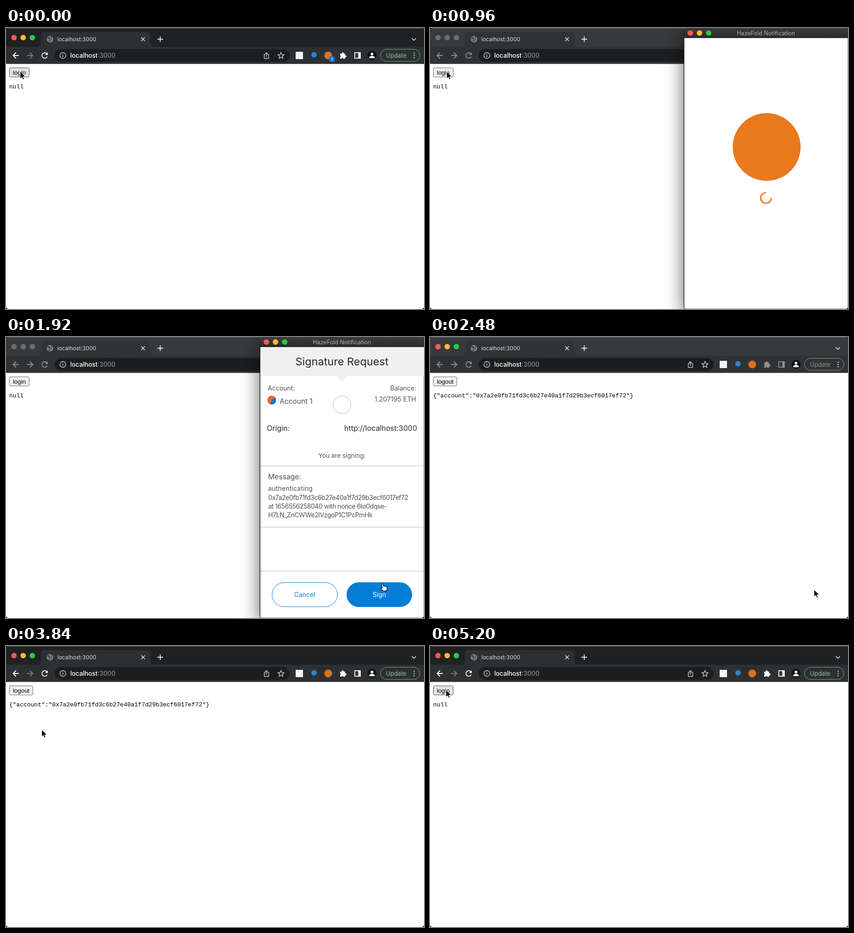
These frames come from a looping animation (912x614 px, 5360 ms). An HTML page:

```html
<!DOCTYPE html>
<html lang="en">
<head>
<meta charset="utf-8">
<title>Login flow</title>
<style>
html, body { margin: 0; width: 100%; height: 100%; overflow: hidden; background: #000; }
svg { display: block; width: 912px; height: 614px; font-family: Inter, "Open Sans", sans-serif; }
#stage { --frame: #1f2122; --bar: #2d3032; --icon: #fff; --fwd: #7b7e81; --update: #81c995; }
#stage.idle { --frame: #37393b; --bar: #303335; --icon: #8f9294; --fwd: #8f9294; --update: #8b9690; }
.frame { fill: var(--frame); }
.bar { fill: var(--bar); }
.line { fill: none; stroke: var(--icon); stroke-width: 1.8; }
.soft { fill: none; stroke: #c8cbce; stroke-width: 1.4; }
.solid { fill: var(--icon); }
.mono { font: 13px "Liberation Mono", monospace; }
.btn { font: 13.33px "Liberation Sans", Arial, sans-serif; }
.body { font-size: 14px; fill: #4d5156; }
.tight { letter-spacing: -.43px; }
.rule { stroke: #b9bbbd; }
.end { text-anchor: end; }
.mid { text-anchor: middle; }
</style>
</head>
<body>
<svg id="stage" viewBox="0 0 912 614">
  <defs>
    <clipPath id="corners"><rect width="912" height="614" rx="5"/></clipPath>
    <filter id="shadow" x="-30%" y="-20%" width="160%" height="145%">
      <feDropShadow dx="0" dy="14" stdDeviation="20" flood-color="#000" flood-opacity=".6"/>
    </filter>
    <linearGradient id="titlebar" x2="0" y2="1">
      <stop stop-color="#3c3d3f"/><stop offset="1" stop-color="#292a2b"/>
    </linearGradient>
  </defs>

  <g clip-path="url(#corners)">
    <rect width="912" height="614" fill="#fff"/>
    <rect class="frame" width="912" height="42"/>
    <path d="M0 .5H912" stroke="#66686a"/>
    <rect class="bar" y="41" width="912" height="37.5"/>
    <path class="bar" d="M68 41q8 0 8-8V17q0-8 8-8H307q8 0 8 8V33q0 8 8 8Z"/>
    <g id="lights"></g>

    <circle cx="96" cy="24.5" r="7" fill="#8d9093"/>
    <path d="M91 21q4-1 4 1t3 2-1 4-3-2-4-2M98 18q0 3 4 4" fill="none" stroke="#3b3e40" stroke-width="1.7"/>
    <text x="112" y="29" font-size="12" fill="#dcdee0">localhost:3000</text>
    <path d="M295 20.5l8 8m0-8l-8 8" stroke="#e2e4e6" stroke-width="1.6"/>
    <path d="M330.500 24.500h12m-6-6v12" stroke="#eee" stroke-width="1.8"/>
    <path d="M885.500 22.500l4.500 4.500 4.500-4.500" fill="none" stroke="#e2e4e6" stroke-width="1.7"/>

    <path class="line" d="M28 60H15.500m6.500-6.500L15.500 60l6.500 6.500"/>
    <path class="line" style="stroke:var(--fwd)" d="M46 60h12.500m-6.500-6.500l6.500 6.500-6.500 6.500"/>
    <path class="line" d="M90 62.500a6 6 0 1 1-1.500-7"/>
    <path class="solid" d="M91 53v6h-6z"/>

    <rect x="106" y="46" width="513" height="28" rx="14" fill="#1b1d1e"/>
    <circle class="soft" cx="124" cy="60" r="6.500"/>
    <path d="M124 59v4.500m0-7.500v1.500" stroke="#c8cbce" stroke-width="1.500"/>
    <text x="140" y="65" font-size="13.800" fill="#9aa0a6"><tspan fill="#fff" font-weight="500">localhost</tspan>:3000</text>
    <path class="soft" d="M566 58h-2.500v8.500h9.500V58H570.500M568.200 63v-9m-3 2.800l3-3 3 3"/>
    <path class="soft" d="M600 53.500l1.900 4.500 4.800.4-3.700 3.200 1.100 4.700-4.100-2.500-4.100 2.500 1.100-4.700-3.700-3.200 4.800-.4z"/>

    <rect x="632" y="52" width="16" height="16" fill="#f4f4f4"/>
    <circle cx="672" cy="58.500" r="6" fill="#2f83cf"/>
    <circle cx="703" cy="60" r="8.500" fill="#d9721f"/>
    <g id="badge">
      <rect x="705" y="62" width="12" height="12" rx="2" fill="#1273de"/>
      <text class="mid" x="711" y="71.500" font-size="9" fill="#fff">1</text>
    </g>
    <path class="solid" d="M729 56h3.500a2.200 2.200 0 1 1 4.200 0H740v4a2.200 2.200 0 1 1 0 4.200V67h-4a2.200 2.200 0 0 0-4 0h-3v-3.500a2.200 2.200 0 0 0 0-4z"/>
    <rect class="line" x="761" y="54" width="12" height="12"/>
    <path class="solid" d="M768.500 53h5.500v14h-5.500z"/>
    <circle cx="798.500" cy="60" r="10" fill="#111213"/>
    <circle cx="798.500" cy="57" r="3" fill="#fff"/>
    <path d="M792.500 66v-1.500q0-3.500 6-3.500t6 3.500V66z" fill="#fff"/>
    <rect x="817" y="46.500" width="86" height="26.500" rx="13.200" fill="none" stroke="#6fb184"/>
    <text x="829" y="64.500" font-size="13" style="fill:var(--update)">Update</text>
    <path d="M890.500 55v.01m0 4.990v.01m0 4.990v.01" stroke="#9fc9ac" stroke-width="2.800" stroke-linecap="round"/>

    <rect id="button" x="7.500" y="87" height="20" rx="2.500"/>
    <text id="label" class="btn" x="15" y="101.500"></text>
    <text id="output" class="mono" x="7" y="132"></text>

    <g id="popup">
      <rect x="554" y="1" width="358" height="613" rx="5" fill="#fff" stroke="#222" filter="url(#shadow)"/>
      <path d="M554.500 22V5q0-5 5-5H907q5 0 5 5V22z" fill="url(#titlebar)"/>
      <path d="M554.500 5V610" stroke="#222"/>
      <g id="popupLights"></g>
      <text id="popupTitle" class="mid" x="733" y="16" font-size="12.500" fill="#b2b3b4">HazeFold Notification</text>

      <g id="loading">
        <circle cx="734.500" cy="260" r="74" fill="#e8791f"/>
        <path id="spinner" d="M744.500 371.500a11.500 11.500 0 1 1-11.500-11.500" fill="none" stroke="#e8842f" stroke-width="3.200"/>
      </g>

      <g id="request">
        <path d="M555 22H912V85H747L733 98 719 85H555z" fill="#f0f0f1"/>
        <text class="mid" x="733" y="62" font-size="23.500" fill="#24272a">Signature Request</text>
        <g class="body">
          <text x="571" y="117">Account:</text>
          <text class="end" x="895" y="117">Balance:</text>
          <text x="597" y="146" font-size="15.500">Account 1</text>
          <text class="end" x="895" y="141" font-size="14.300">1.207195 ETH</text>
          <text class="mid" x="733" y="264" font-size="13.600">You are signing:</text>
          <text x="572" y="311" font-size="15.600">Message:</text>
          <text x="572" y="336" letter-spacing=".2">authenticating</text>
          <text id="hash" class="tight" x="572" y="355.500"></text>
          <text class="tight" x="572" y="375">at 1656556258040 with nonce 6Io0dqse-</text>
          <text class="tight" x="572" y="394">H7LN_ZnCWWe2IVzgoP1C1PcPmHk</text>
        </g>
        <circle cx="580" cy="138" r="9.500" fill="#1f74c4"/>
        <path d="M587 131.500A9.500 9.500 0 1 0 576 146.600L580 138z" fill="#f2602c"/>
        <circle cx="733" cy="148" r="19.500" fill="#fff" stroke="#b4b6b8"/>
        <g font-size="16" fill="#24272a">
          <text x="569" y="205">Origin:</text>
          <text class="end" x="897" y="205">http://localhost:3000</text>
        </g>
        <path class="rule" d="M555 281.500H912M555 415.500H912M555 511.500H912"/>
        <g class="mid" font-size="14">
          <rect x="580.500" y="536.500" width="142.500" height="53" rx="26.500" fill="#fff" stroke="#037dd6"/>
          <text x="651.500" y="568" fill="#037dd6">Cancel</text>
          <rect x="743" y="536" width="143" height="54" rx="27" fill="#037dd6"/>
          <text x="814.500" y="568" fill="#fff">Sign</text>
        </g>
      </g>
    </g>

    <g id="cursor">
      <path id="arrow" d="M0 0V15.500L3.600 12.200 6 17.600 8.600 16.400 6.200 11.200H11z" fill="#000" stroke="#fff"/>
      <path id="hand" d="M-1.500 1q1.500-1.800 2.800.2L3 5.500q1.500-1 2.500.3 1.500-.8 2.500.5 1.800-.3 2.200 1.500l.3 4-1.800 4H2L-2.800 10.500q-1.200-2 .8-2.200L.300 9.500z" fill="#fff" stroke="#000" stroke-width="1.200"/>
    </g>
  </g>
</svg>
<script>
const LOOP = 5360, STEP = 80;
const ACCOUNT = "0x7a2e0fb71fd3c6b27e40a1f7d29b3ecf6017ef72";
const LIGHTS = ["#fe5c54", "#febc2e", "#2bc840"];
const T = { popup: 160, request: 1280, hand: 1600, close: 2320, focus: 2560, logout: 4880 };

// time, x, y
const PATH = [
  [0, 31, 95], [480, 31, 95], [960, 36.5, 95], [1040, 60, 190], [1120, 144, 432],
  [1200, 330, 530], [1360, 640, 560], [1520, 790, 548], [1680, 821, 539],
  [2320, 821, 539], [2480, 838, 552], [3200, 838, 552], [3360, 700, 480],
  [3520, 400, 390], [3680, 117, 266], [3840, 78, 183], [4000, 50, 122],
  [4240, 37, 100], [4400, 35, 96], [LOOP, 35, 96]
];
// time, scale, opacity
const OPENING = [[160, .704, .64], [240, .92, .9], [320, 1, 1]];

const $ = id => document.getElementById(id);
const show = (id, on) => $(id).style.display = on ? "" : "none";

function along(keys, t) {
  if (t <= keys[0][0]) return keys[0].slice(1);
  const i = keys.findIndex(k => k[0] > t);
  if (i < 0) return keys[keys.length - 1].slice(1);
  const a = keys[i - 1], b = keys[i], p = (t - a[0]) / (b[0] - a[0]);
  return [1, 2].map(n => a[n] + (b[n] - a[n]) * p);
}

function addLights(id, x, y) {
  $(id).innerHTML = LIGHTS.map((c, i) =>
    `<circle cx="${x + i * 20}" cy="${y}" r="6" fill="${c}"/>`).join("");
}

function drawPage(t, x, y) {
  const signedIn = t >= T.close && t < T.logout;
  const width = signedIn ? 51 : 43;
  const inside = x > 7 && x < 8 + width && y > 87 && y < 107;
  const hover = inside && (t < 640 || t > T.close);
  const button = $("button");
  button.setAttribute("width", width);
  button.setAttribute("fill", hover ? "#e3e3e3" : "#efefef");
  button.setAttribute("stroke", hover ? "#4a4a4a" : "#666");
  $("label").textContent = signedIn ? "logout" : "login";
  $("output").textContent = signedIn ? JSON.stringify({ account: ACCOUNT }) : "null";
}

function drawPopup(t) {
  const open = t >= T.popup && t < T.close;
  show("popup", open);
  if (!open) return;
  const [scale, opacity] = along(OPENING, t);
  const popup = $("popup");
  popup.setAttribute("transform", `translate(733 308) scale(${scale}) translate(-733 -308)`);
  popup.setAttribute("opacity", opacity);
  show("popupTitle", scale === 1);
  show("loading", t < T.request);
  show("request", t >= T.request);
  $("spinner").setAttribute("transform", `rotate(${(t - 160) / 800 * 360} 733 371.5)`);
}

function draw(t) {
  const [x, y] = along(PATH, t);
  const covered = t >= T.popup && t < T.close;
  $("stage").classList.toggle("idle", t >= T.popup && t < T.focus);
  [...$("lights").children].forEach((c, i) =>
    c.setAttribute("fill", covered ? "#6a6c6e" : LIGHTS[i]));
  show("badge", t < T.close);
  drawPage(t, x, y);
  drawPopup(t);
  const hand = t >= T.hand && t < T.close;
  show("hand", hand);
  show("arrow", !hand);
  $("cursor").setAttribute("transform", `translate(${x} ${y})`);
}

addLights("lights", 17.5, 21);
addLights("popupLights", 568, 11);
$("hash").textContent = ACCOUNT;

const start = performance.now();
function tick() {
  const t = (performance.now() - start) % LOOP;
  draw(Math.floor(t / STEP) * STEP);
  requestAnimationFrame(tick);
}
tick();
</script>
</body>
</html>
```
